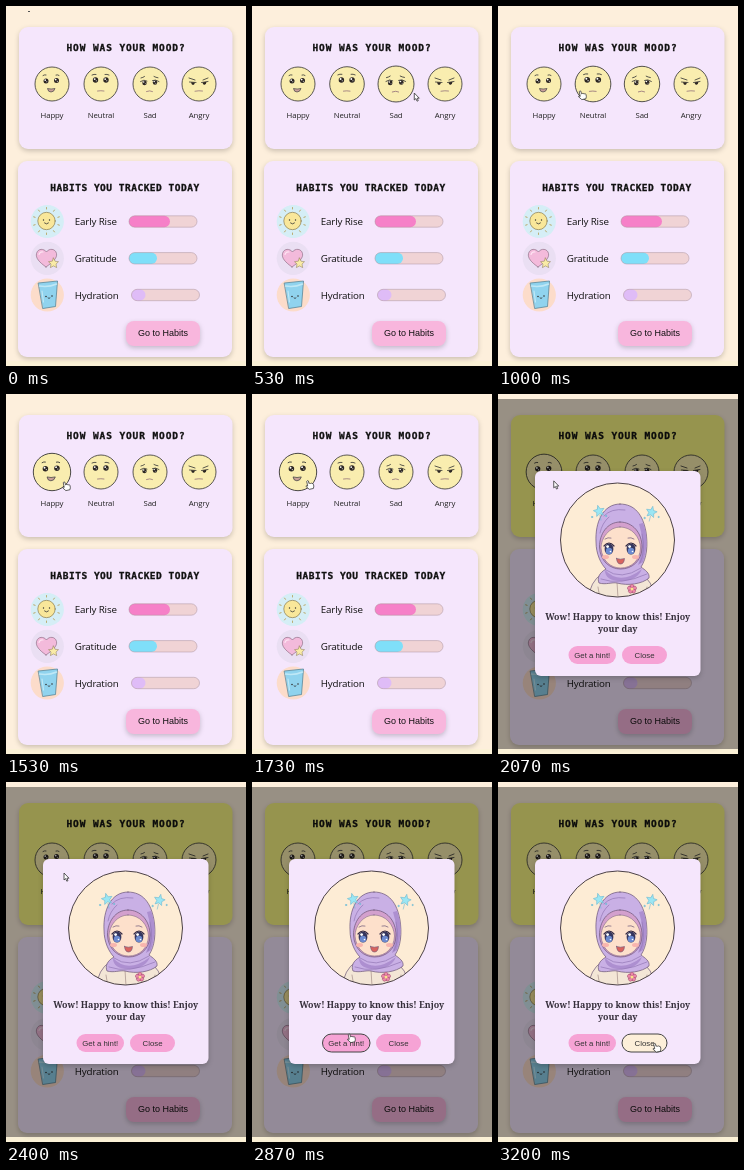
These frames come from a looping animation (240x360 px, 3.27 s). An HTML page:

```html
<!DOCTYPE html>
<html lang="en">
<head>
<meta charset="utf-8">
<title>Mood and habits</title>
<style>
html, body { margin: 0; width: 100%; height: 100%; overflow: hidden; background: #fdefdc; }
svg { display: block; width: 240px; height: 360px; }
text { font-family: "Open Sans", "Noto Sans", sans-serif; }
.mid { text-anchor: middle; }
.title { font: bold 9.5px "DejaVu Sans Mono", monospace; letter-spacing: .9px; fill: #111; stroke: #111; stroke-width: .3; }
.label { font-size: 7.8px; letter-spacing: -.1px; fill: #222; }
.habit { font-size: 9.8px; letter-spacing: -.15px; fill: #111; }
.btn { font-family: "Liberation Sans", Arial, sans-serif; font-size: 7.8px; fill: #333; }
.msg { font: 600 8.9px "Noto Serif", serif; fill: #352e3a; }
.line { fill: none; stroke: #333; stroke-width: .8; stroke-linecap: round; stroke-linejoin: round; }
.shadow { filter: drop-shadow(0 2px 2.5px #0003); }
</style>
</head>
<body>
<svg viewBox="0 0 240 360">
  <rect width="240" height="360" fill="#fdefdc"/>
  <rect y="355" width="240" height="5" fill="#fbf1d6"/>
  <path id="speck" d="M22 5.500h2" stroke="#555"/>

  <rect id="moodCard" class="shadow" x="13" y="21" width="213.500" height="122" rx="9"/>
  <text class="title mid" x="120" y="44.500">HOW WAS YOUR MOOD?</text>
  <g id="faces"></g>

  <rect class="shadow" x="12" y="155" width="214" height="196" rx="9" fill="#f5e6fc"/>
  <text class="title mid" x="119" y="184.700" style="letter-spacing:.5px">HABITS YOU TRACKED TODAY</text>
  <g id="habits"></g>

  <g stroke-linejoin="round" stroke-linecap="round">
    <g id="rays" stroke="#b9a565" stroke-width=".9"></g>
    <circle cx="40.500" cy="215" r="8.700" fill="#f9e79a" stroke="#77683f" stroke-width=".6"/>
    <path class="line" d="M38.500 217q2 2 4 0" stroke-width=".6"/>
    <g fill="#333"><circle cx="37.500" cy="214" r=".7"/><circle cx="43.500" cy="214" r=".7"/></g>
    <path d="M40 261C33 256 29.500 252 30.500 247.500C32 242 38 242.500 40.500 246C43 242 49.500 242.500 50.500 247.500C51.500 252 47 256 40 261Z" fill="#f3badb" stroke="#80647a" stroke-width=".6"/>
    <path d="M33 248.500q1-3 4-2.500" fill="none" stroke="#fde3f2" stroke-width="1.200"/>
    <path d="M47.500 252l1.500 3.200 3.500.5-2.500 2.400.7 3.500-3.200-1.700-3.100 1.700.6-3.500-2.500-2.400 3.500-.5z" fill="#f9eba6" stroke="#84744e" stroke-width=".5"/>
    <path d="M32.500 277L51.500 275L49.500 300.500L37 302.500Z" fill="#90d3ee" stroke="#4d7c90" stroke-width=".7"/>
    <path d="M33.500 280q9 1.500 17-2" fill="none" stroke="#bfe8f6" stroke-width="1.500"/>
    <path d="M36 285l1.500 11" stroke="#bfe8f6" stroke-width="1.200"/>
    <g fill="#333"><circle cx="40" cy="290.500" r=".8"/><circle cx="46" cy="290" r=".8"/></g>
    <path class="line" d="M42 292q1 1 2 0"/>
  </g>

  <rect class="shadow" x="120" y="315" width="74" height="25" rx="8" fill="#f8b6dd"/>
  <text class="btn mid" x="157" y="330.300" style="font-size:9px;fill:#111">Go to Habits</text>

  <g id="popup">
    <rect y="5" width="240" height="350" fill="#000" opacity=".4"/>
    <rect class="shadow" x="37" y="77" width="165.500" height="205" rx="6" fill="#f5e6fc"/>
    <clipPath id="disc"><circle cx="119.500" cy="146" r="57"/></clipPath>
    <circle cx="119.500" cy="146" r="57" fill="#fdecd5"/>
    <g clip-path="url(#disc)" stroke="#6a5576" stroke-width=".7" stroke-linejoin="round" stroke-linecap="round">
      <path d="M90 206Q92 187 104 180H142Q155 185 157 206Z" fill="#f3e6d6"/>
      <path d="M119 188l1 16M100 193l2 12M149 193l-2 12" fill="none" stroke="#a58f88"/>
      <path d="M122 110C105 110 97 128 98 148C98 160 103 170 108 175C101 179 99 184 101 189C108 191 114 188 119 189C130 192 144 190 151 184C152 179 147 176 143 173C149 164 150 151 148 138C145 121 137 110 122 110Z" fill="#c9b0e5"/>
      <path d="M141 130Q148 150 140 171L145 168Q152 146 145 129Z" fill="#ad8fd0" stroke="none"/>
      <path d="M107 176Q122 192 144 175Q139 187 123 187T107 176Z" fill="#ad8fd0" stroke="none"/>
      <path d="M122 128C109 128 101.500 140 101.500 153C102 167 112 175 122.500 175C134 175 144 167 144 153C144 139 135 128 122 128Z" fill="#d3a0cd"/>
      <path d="M122 133C111 133 103 144 103 154C104 167 113 174 122.500 174C134 174 142 166 142.500 154C142 143 134 133 122 133Z" fill="#fde0cb" stroke-width=".5"/>
      <path d="M108 176Q123 187 143 174M103 185Q122 192 149 180M106 122Q113 114 127 116M144 140Q148 157 142 169M102 139Q104 129 111 123" fill="none" stroke="#9377b5"/>
      <g stroke="none" fill="#f8b5ae">
        <ellipse cx="107.500" cy="163" rx="3.500" ry="2"/><ellipse cx="137.500" cy="163" rx="3.500" ry="2"/>
      </g>
      <g id="eyes" stroke="none"></g>
      <path d="M107 145q3-2 6-1M130 144q3-1 6 1" fill="none"/>
      <path d="M118.500 164.500Q122.500 166 126.500 164.500Q126 170 122.500 170T118.500 164.500Z" fill="#d9635f" stroke-width=".6"/>
      <g id="flower" stroke="#a04e70" stroke-width=".5" fill="#ec86a8"></g>
      <circle cx="134" cy="195" r="1.500" fill="#fbe28c" stroke="none"/>
      <g id="stars" fill="#9be6f3" stroke="#62b4d0" stroke-width=".6"></g>
    </g>
    <circle cx="119.500" cy="146" r="57" fill="none" stroke="#4b4148"/>
    <text class="msg mid" x="119.700" y="225.500">Wow! Happy to know this! Enjoy</text>
    <text class="msg mid" x="119.700" y="238">your day</text>
    <g id="buttons"></g>
  </g>
  <g id="cursor" fill="#fff" stroke="#333" stroke-width=".8" stroke-linejoin="round">
    <path id="arrow" d="M0 0V7L1.600 5.600L2.800 8.200L4 7.600L2.900 5.200H5Z"/>
    <path id="hand" transform="rotate(-12) scale(.88)" d="M-1 .5Q0-.7 1 .5V3.500Q2 2.800 2.800 3.800Q4 3.200 4.500 4.300Q5.800 4 5.800 5.300V7.500L4.800 10H0L-3 6Q-3 4.500-1 6Z"/>
  </g>
</svg>
<script>
const LOOP = 3270, OPEN = 2000;
const $ = id => document.getElementById(id);
const dot = (x, y, r, fill) => `<circle cx="${x}" cy="${y}" r="${r}" fill="${fill}"/>`;
const line = d => `<path class="line" d="${d}"/>`;
const eye = (x, y, r) => dot(x, y, r, "#2b2522") + dot(x - .8, y - .9, r * .35, "#fff") + dot(x + .8, y + .8, r * .2, "#fff");
const mouth = d => `<path d="${d}" fill="none" stroke="#a08080" stroke-width=".9" stroke-linecap="round"/>`;

// Face details are drawn around each face's own centre.
const faces = [
  ["Happy", eye(-6, -3, 2.5) + eye(4.5, -3.5, 2.5) + line("M-9-8.500q1.500-1 3-.6M4-9q1.500-.6 3 .4") +
    `<path d="M-4.500 4.500Q-1 5.500 3 4.500Q2 8-1 8T-4.500 4.500Z" fill="#c9a09a" stroke="#444" stroke-width=".7"/>`],
  ["Neutral", eye(-5.5, -4, 2.7) + eye(5, -4, 2.7) + line("M-9-9q2-1 4-.6M4-9.600q2-.4 4 .6") + mouth("M-3.500 7q3.500-.6 6.500 0")],
  ["Sad", eye(-5.5, -1, 2.2) + eye(5, -1.5, 2.2) + line("M-9.500-2.500q3.500-2.500 6.500-.5M2.500-3.500q3-1.500 6.500 1M-9-6q2-.4 3.500-1.500M4-7.500q2 1 4 1.300") + mouth("M-3.500 7.500q3.500-1.400 6 0")],
  ["Angry", line("M-10-6L-4-4M9-6L4-4M-9.500-2L-3-1.500M9-2.500L2.500-1.500") +
    `<path d="M-8-1.800L-4-1.500Q-4.500 1-6 .9T-8-1.800ZM7.500-2.200L3.500-1.600Q4 1 5.600.7T7.500-2.200Z" fill="#2b2522"/>` + mouth("M-4 7.200q4-.8 7.500-.2")]
].map(([name, art], i) => ({ name, art, x: 46 + 49 * i, y: 78 }));

$("faces").innerHTML = faces.map(f =>
  `<g class="face"><circle r="17" fill="#f9edaf" stroke="#333" stroke-width=".8"/>${f.art}</g>
   <text class="label mid" x="${f.x}" y="111.500">${f.name}</text>`).join("");

$("habits").innerHTML = [
  ["Early Rise", 215.5, 123, 41, "#f680c8", "#d5eef6"],
  ["Gratitude", 252.3, 123, 28, "#7fdff9", "#eadff3"],
  ["Hydration", 289, 125.5, 14, "#dfbcf7", "#fcdcca"]
].map(([name, y, x, w, fill, disc]) => {
  const bar = (w, extra) => `<rect x="${x}" y="${y - 5.7}" width="${w}" height="11.400" rx="5.700" ${extra}/>`;
  return dot(41.3, y, 16.6, disc) + `<text class="habit" x="68.700" y="${y + 3.7}">${name}</text>` +
    bar(68, 'fill="#f0d3d5"') + bar(w, `fill="${fill}"`) + bar(68, 'fill="none" stroke="#a9929f" stroke-width=".5"');
}).join("");

const spin = (n, x, y, art) => Array.from({ length: n }, (_, i) =>
  `<g transform="translate(${x} ${y}) rotate(${i * 360 / n})">${art}</g>`).join("");
$("rays").innerHTML = spin(10, 40.5, 215, '<path d="M0-12v-1.500"/>');
$("flower").innerHTML = spin(5, 134, 195, '<circle cy="-2.700" r="2"/>');
$("eyes").innerHTML = [111, 133].map(x =>
  `<ellipse cx="${x}" cy="155" rx="4.400" ry="5.500" fill="#35365f"/><ellipse cx="${x}" cy="157" rx="3.200" ry="3.200" fill="#6c8ad0"/>` +
  dot(x - 1.4, 152.6, 1.4, "#fff") + dot(x + 1.5, 157.5, .8, "#fff") +
  `<path d="M${x - 5} 152q5-6 10 0" fill="none" stroke="#352b45" stroke-width="1.200"/>`).join("");
$("stars").innerHTML = [[101, 117, -12], [153.5, 118, 14]].map(([x, y, a]) =>
  `<g transform="translate(${x} ${y}) rotate(${a}) scale(.85)"><path d="M0 5v6"/>
   <path d="M0-6.500L1.900-2.300 6.400-1.800 3 1.300 4 5.700 0 3.400-4 5.700-3 1.300-6.400-1.800-1.900-2.300Z"/></g>
   ${dot(x - 7, y + 6, .7, "#b5e8f2")}${dot(x + 7, y + 5, .6, "#b5e8f2")}`).join("");

const buttons = [{ text: "Get a hint!", x: 70.5, w: 47.5 }, { text: "Close", x: 124, w: 45 }];
$("buttons").innerHTML = buttons.map(b =>
  `<rect x="${b.x}" y="252" width="${b.w}" height="18" rx="9"/>
   <text class="btn mid" x="${b.x + b.w / 2}" y="263.800">${b.text}</text>`).join("");

const faceEls = document.querySelectorAll(".face");
const buttonEls = document.querySelectorAll("#buttons rect");

// Pointer tip: time, x, y
const path = [
  [0, 22, -10], [200, 50, 84], [350, 95, 87], [480, 146, 87], [620, 200, 87], [720, 204, 86],
  [860, 146, 87], [1000, 82, 85], [1200, 54, 86], [1530, 58, 88], [1870, 54, 86],
  [2130, 56, 87], [2400, 58, 91], [2560, 66, 125], [2870, 97, 252], [2950, 100, 256],
  [3110, 152, 261], [3200, 156.5, 261.5], [LOOP, 157, 262]
];
const clamp = v => Math.max(0, Math.min(1, v));

function pointer(t) {
  const i = Math.max(1, path.findIndex(p => p[0] >= t));
  const [t0, x0, y0] = path[i - 1], [t1, x1, y1] = path[i];
  const u = clamp((t - t0) / (t1 - t0)), e = u * u * (3 - 2 * u);
  return [x0 + (x1 - x0) * e, y0 + (y1 - y0) * e];
}

function overFace(f, t) {
  const [x, y] = pointer(t);
  return t < OPEN && Math.hypot(x - f.x, y - f.y) < 18;
}

function overButton(b, t) {
  const [x, y] = pointer(t);
  return t >= OPEN && x > b.x && x < b.x + b.w && y > 251 && y < 270;
}

// Share of the recent past spent hovering: works like a CSS transition.
function eased(test, item, t, span) {
  let sum = 0;
  for (let i = 0; i < 12; i++) sum += test(item, t - span * i / 12);
  return sum / 12;
}

const mix = (a, b, k) => `rgb(${a.map((v, i) => v + (b[i] - v) * k)})`;

function draw(now) {
  const t = now % LOOP;
  const [x, y] = pointer(t);
  let hot = false;

  faces.forEach((f, i) => {
    hot = hot || overFace(f, t);
    const scale = 1 + .1 * eased(overFace, f, t, 160);
    faceEls[i].setAttribute("transform", `translate(${f.x} ${f.y}) scale(${scale})`);
  });
  buttons.forEach((b, i) => {
    const over = overButton(b, t);
    hot = hot || over;
    buttonEls[i].setAttribute("fill", mix([246, 163, 213], [253, 239, 217], eased(overButton, b, t - 40, 80)));
    buttonEls[i].setAttribute("stroke", over ? "#444" : "none");
  });

  const card = t < 1860
    ? mix([245, 230, 252], [232, 232, 130], clamp((t - 1740) / 120))
    : mix([232, 232, 130], [249, 246, 130], clamp((t - 1880) / 120));
  $("moodCard").setAttribute("fill", card);
  $("popup").style.display = t < OPEN ? "none" : "";
  $("speck").style.display = t < 70 ? "" : "none";
  $("cursor").style.display = t < 70 ? "none" : "";
  $("cursor").setAttribute("transform", `translate(${x} ${y})`);
  $("hand").style.display = hot ? "" : "none";
  $("arrow").style.display = hot ? "none" : "";
}

const start = performance.now();
function tick() {
  draw(performance.now() - start);
  requestAnimationFrame(tick);
}
tick();
</script>
</body>
</html>
```
